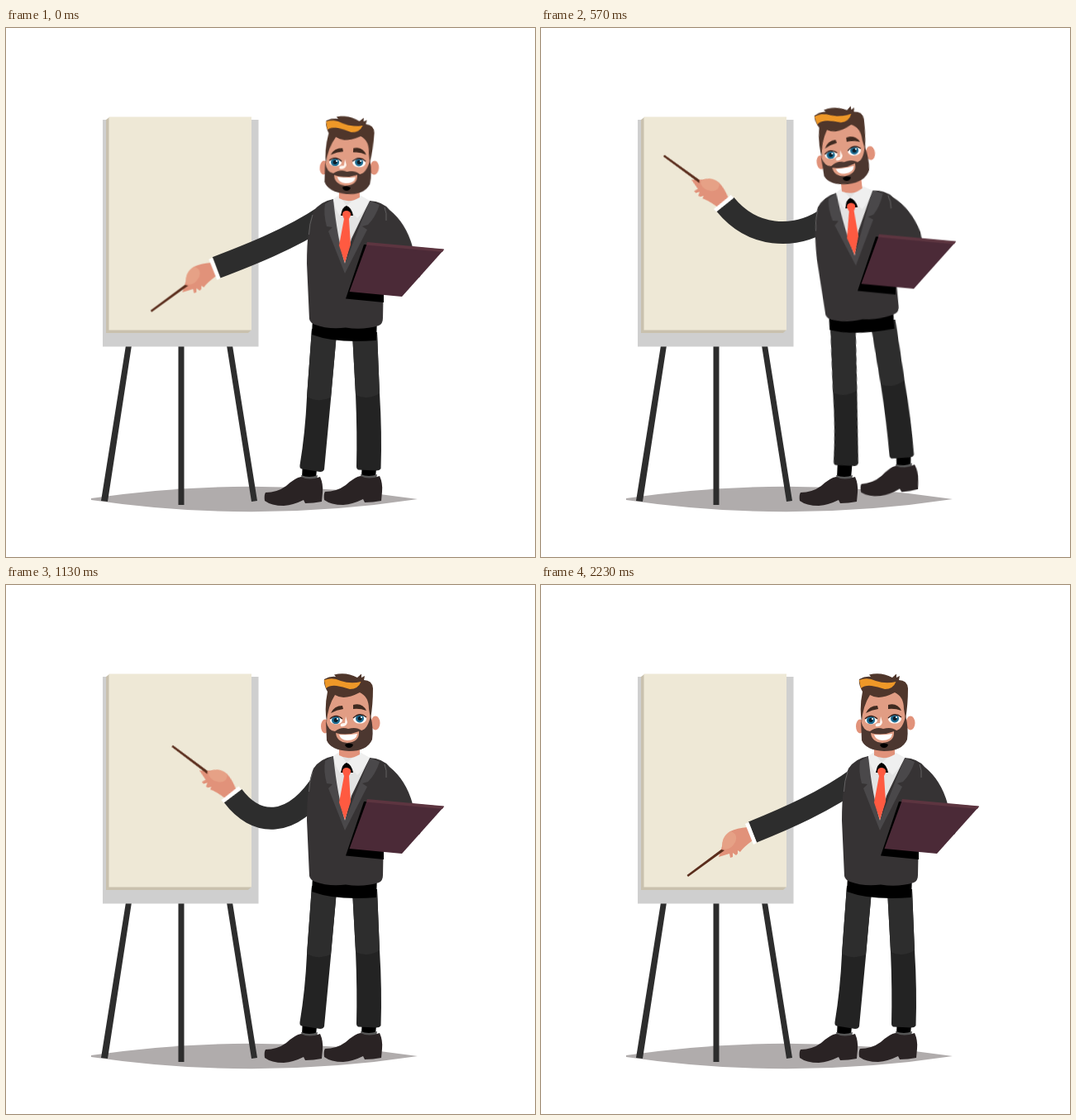
Write an HTML page without scripts that moves like this. It is 640 px wide and 640 px high and loops after 2.93 s.

```html
<!DOCTYPE html>
<html lang="en">
<head>
<meta charset="utf-8">
<title>Presenter at a flip chart</title>
<style>
html, body { margin: 0; width: 100%; height: 100%; overflow: hidden; background: #fff; }
svg { display: block; width: 100vw; height: 100vh; }

.lean, .head, .hand, .sleeve, .lid { animation: 2930ms linear infinite; }

/* Weight shift towards the board and back; each part sets its own travel. */
.lean { --back: .12; animation-name: lean; transform-origin: var(--o); }
.body { --o: 410px 366px; --x: -21.5px; --y: -10px; --r: -6.3deg; }
.front { --o: 370px 534px; --x: -1px; --y: -6px; --r: -6.4deg; }
.rear { --o: 439px 535px; --x: -2px; --y: -15px; --r: -6.3deg; }
.shoe { --o: 440px 541px; --x: 0px; --y: -13px; --r: -4deg; }
.laptop { --o: 470px 290px; --x: -28px; --y: -9.5px; --r: 0deg; --back: .5; }
@keyframes lean {
  0%, 38.6%, 100% { transform: translate(0, 0) rotate(0deg); animation-timing-function: cubic-bezier(.35, .15, .6, .92); }
  6.83% { transform: translate(calc(var(--x) * .92), calc(var(--y) * .92)) rotate(calc(var(--r) * .96)); animation-timing-function: cubic-bezier(.1, .5, .4, 1); }
  18.1%, 25.3% { transform: translate(var(--x), var(--y)) rotate(var(--r)); animation-timing-function: cubic-bezier(.35, .15, .6, .92); }
  29.7% { transform: translate(calc(var(--x) * var(--back)), calc(var(--y) * var(--back))) rotate(calc(var(--r) * var(--back))); animation-timing-function: cubic-bezier(.1, .5, .4, 1); }
}

.head { animation-name: head; transform-origin: 415px 165px; }
@keyframes head {
  0% { transform: translate(-1px, 0) rotate(4deg); }
  6.83% { transform: translate(-2.5px, -3px) rotate(1.5deg); animation-timing-function: ease-out; }
  18.1%, 25.3% { transform: translate(-4.5px, -3px) rotate(-.5deg); }
  29.7% { transform: translate(-1px, -1px) rotate(-.6deg); animation-timing-function: ease-out; }
  38.6%, 54.3% { transform: translate(0, 0) rotate(0deg); animation-timing-function: ease-in-out; }
  67.2% { transform: translate(-2.7px, 1.5px) rotate(-5deg); animation-timing-function: ease-in-out; }
  76.1%, 100% { transform: translate(0, 0) rotate(0deg); }
}

.hand { animation-name: hand; transform-origin: 256px 299px; }
@keyframes hand {
  0% { transform: translate(-1.5px, -9px) rotate(0deg); animation-timing-function: cubic-bezier(.35, .15, .6, .92); }
  6.83% { transform: translate(-30.5px, -80px) rotate(67deg); animation-timing-function: cubic-bezier(.1, .5, .4, 1); }
  18.1%, 25.3% { transform: translate(-33px, -85.5px) rotate(72.4deg); animation-timing-function: cubic-bezier(.35, .15, .6, .92); }
  29.7% { transform: translate(10.5px, -50.5px) rotate(74.5deg); animation-timing-function: cubic-bezier(.1, .5, .4, 1); }
  38.6%, 54.3% { transform: translate(18.5px, -44px) rotate(73.3deg); animation-timing-function: cubic-bezier(.4, 0, .5, .95); }
  67.2% { transform: translate(1px, -3px) rotate(5deg); animation-timing-function: ease-out; }
  72.7%, 100% { transform: translate(0, 0) rotate(0deg); }
}

.sleeve { animation-name: sleeve; fill: none; stroke: #2d2d2d; stroke-width: 27; }
@keyframes sleeve {
  0% { d: path("M254.5 290C291 276 345 255 385 228"); animation-timing-function: cubic-bezier(.35, .15, .6, .92); }
  6.83% { d: path("M225.5 219C258 255 307 257 351 229"); animation-timing-function: cubic-bezier(.1, .5, .4, 1); }
  18.1%, 25.3% { d: path("M223 213.5C254.5 252 305 259 349 228.6"); animation-timing-function: cubic-bezier(.35, .15, .6, .92); }
  29.7% { d: path("M266.5 248.5C293 284 338 292 381 232"); animation-timing-function: cubic-bezier(.1, .5, .4, 1); }
  38.6%, 54.3% { d: path("M274.5 255C301.5 291 345 298 385 235"); animation-timing-function: cubic-bezier(.4, 0, .5, .95); }
  67.2% { d: path("M257 296C295 284 345 260 385 230"); animation-timing-function: ease-out; }
  72.7%, 100% { d: path("M256 299C293 284 345 262 385 232"); }
}

.lid { animation-name: blink; }
@keyframes blink {
  0%, 54.3%, 63.1%, 100% { transform: translateY(-11px); }
  57%, 59.7% { transform: translateY(0); }
}
</style>
</head>
<body>
<svg viewBox="0 0 640 640">
  <defs>
    <clipPath id="eyes">
      <ellipse cx="399.500" cy="163.500" rx="7.500" ry="5"/>
      <ellipse cx="428" cy="162" rx="8" ry="5.500"/>
    </clipPath>
    <g id="foot">
      <path d="M359 522H377L375 545H358Z"/>
      <path fill="#555" d="M357 541Q367 545 377 541L376 547H358Z"/>
      <path fill="#2a2324" d="M314 562Q328 562 339 554Q350 544 357 543Q367 548 380 543Q384 552 383 562L382 573Q372 575 362 575L360 571Q348 577 336 578Q321 578 313 572Q312 565 314 562Z"/>
    </g>
    <g id="eye">
      <circle r="5" fill="#1c6c92"/>
      <circle r="2.500" fill="#0b1c28"/>
      <circle cx="2" cy="-1.500" r="1.100" fill="#fff"/>
    </g>
  </defs>

  <!-- Easel -->
  <path fill="#b0acac" d="M103 569Q300 540 498 570Q300 600 103 571Z"/>
  <path fill="#2d2d2d" d="M145 384H152L123 573L115 572ZM208.500 384H215.500V577H208.500ZM267 384H274L304 572L297 573Z"/>
  <path fill="#cfcfcf" d="M117 111H305.500V385.500H117Z"/>
  <path fill="#c9c1ae" d="M121 111L125 108V365H297L293 369H121Z"/>
  <path fill="#eee8d6" d="M124.500 107.500H297V365.500H124.500Z"/>

  <!-- Legs -->
  <use href="#foot"/>
  <g class="lean shoe"><use href="#foot" x="72" y="-1"/></g>
  <g class="lean rear">
    <path fill="#232323" d="M419 370H449L452 442Q455 490 453.500 533Q452 535.500 448 535.500L426 534.500Q424 534 424 531Q425 490 423 443Z"/>
    <path fill="#2d2d2d" d="M419 368H449L452 442Q437 451 423 444Z"/>
  </g>
  <g class="lean front">
    <path fill="#232323" d="M370 365L400 370L393 449L385 534Q384 537 380 537L358 533.500Q355 533 355.500 529Q362 490 364 447Z"/>
    <path fill="#2d2d2d" d="M370 364L400 370L393 447Q378 454 364 446Z"/>
  </g>

  <!-- Pointing arm -->
  <path class="sleeve" d="M256 299C293 284 345 262 385 232"/>
  <g class="hand">
    <path fill="#e1927a" d="M250 293Q237 294 229 298Q219 306 219 316Q217 324 215 329L228 325L229 330L232 329L232 324L236 327L238 325L238 321L241 323Q244 318 256 309Z"/>
    <path fill="#5a2d1c" d="M176.500 351L218 320L222 321L178 353Z"/>
    <path fill="#e6a186" d="M229 298Q239 301 235 311Q229 322 220 319Q217 305 229 298Z"/>
    <path fill="#fff" d="M247 289L251.500 287L261 312L257 314Z"/>
  </g>

  <!-- Torso -->
  <g class="lean body">
    <path d="M371 352L370 371Q400 382 448 378L449 352Z"/>
    <path fill="#363334" d="M396 207Q380 210 372 222Q364 240 364 285L367 352Q368 357 374 359Q390 365 411 362.500Q432 366 451 360Q456 358 456 351L457 300L494 303Q503 303 501 297Q494 290 492 265Q484 236 464 220Q456 210 440 209L410 240Z"/>
    <path fill="none" stroke="#777" stroke-width=".7" d="M371 226Q367 237 366.500 250M458 217Q461 224 460 233"/>
    <path fill="#4a484a" d="M396 207L386 213Q384 225 388 240L395 241L390 246L410 297L437 244L431 240L438 238Q447 229 452 214L440 209L410 285Z"/>
    <path fill="#e3e3e3" d="M396 207L428 203L440 209L418 255L410 285Q401 255 396 207Z"/>
    <path fill="#efefef" d="M396 207L403 202L412 215L405 228Q398 220 396 207ZM412 215L428 202L440 209Q434 222 425 230Z"/>
    <path fill="#e1927a" d="M403 194H428V205Q415 213 403 206Z"/>
    <path d="M405 227Q407 216 412 215Q418 217 420 227Z"/>
    <path fill="#ff5a41" d="M407 226Q407 221 412.500 221Q418 222 417 227L415 231L417 262L410 284L403 263L409 231Z"/>

    <g class="head">
      <g fill="#e1927a">
        <ellipse cx="386" cy="171" rx="5" ry="8.500"/>
        <ellipse cx="447" cy="167" rx="5.500" ry="8.500"/>
      </g>
      <path fill="#e19d84" d="M389 132Q412 122 440 130L442 172Q440 196 415 198Q392 196 388 178Z"/>
      <path fill="#4f362b" d="M385 114Q392 110 399 111L397 108.500Q412 105 425 112L430 107.500L430 112L434 110L433 115Q443 115 444 125Q444 145 441 162L439 150Q439 135 428 130Q409 140 398 133Q389 147 388 166Q385 148 389 129Q384 121 385 114Z"/>
      <path fill="#ee9828" d="M385 115Q395 111 405 116Q417 120 429.500 117Q426 126 416 126Q407 123 400 122Q392 121 387 125Z"/>
      <path fill="#4c3730" d="M387 164Q390 177 398 177Q406 171 414 174Q424 171 430 176Q438 174 441 158Q445 174 443 187Q437 201 415 201Q393 200 388 188Z"/>
      <path fill="#e19d84" d="M399 179Q413 183 427 177Q428 190 413 191Q400 190 399 179Z"/>
      <path fill="#fff" d="M403 181Q414 182 425 180Q424 188 413 188Q405 188 403 181Z"/>
      <path d="M410 193Q415 190 420 193Q419 197 415 197Q411 197 410 193Z"/>
      <path fill="#402a20" d="M393 155Q397 146 407 146L408 150Q400 151 393 155ZM420 145Q431 142 436 152Q428 149 420 150Z"/>
      <path fill="#fff6f0" d="M411 159L413 166Q412 172 405 171Q403 167 410 167Z"/>
      <g clip-path="url(#eyes)">
        <path fill="#fff" d="M390 155H438V170H390Z"/>
        <use href="#eye" x="399" y="163.500"/>
        <use href="#eye" x="428" y="161.500"/>
        <g class="lid">
          <path fill="#d98a72" d="M388 150H440V168H388Z"/>
          <path fill="#3b211b" d="M388 166L440 164V167L388 169Z"/>
        </g>
      </g>
      <path fill="none" stroke="#3b211b" stroke-width="1.300" d="M392 162Q399 155 407 162M420 161Q428 153 436 160"/>
    </g>
  </g>

  <g class="lean laptop">
    <path d="M433 262L411 327.500L457 332V321L437 262Z"/>
    <path fill="#4b2a37" d="M437 260L530 268L479 325L415.500 319Z"/>
    <path fill="#5d3540" d="M437 259L530 267.500L528 271L436 262.500Z"/>
  </g>
</svg>
</body>
</html>
```
